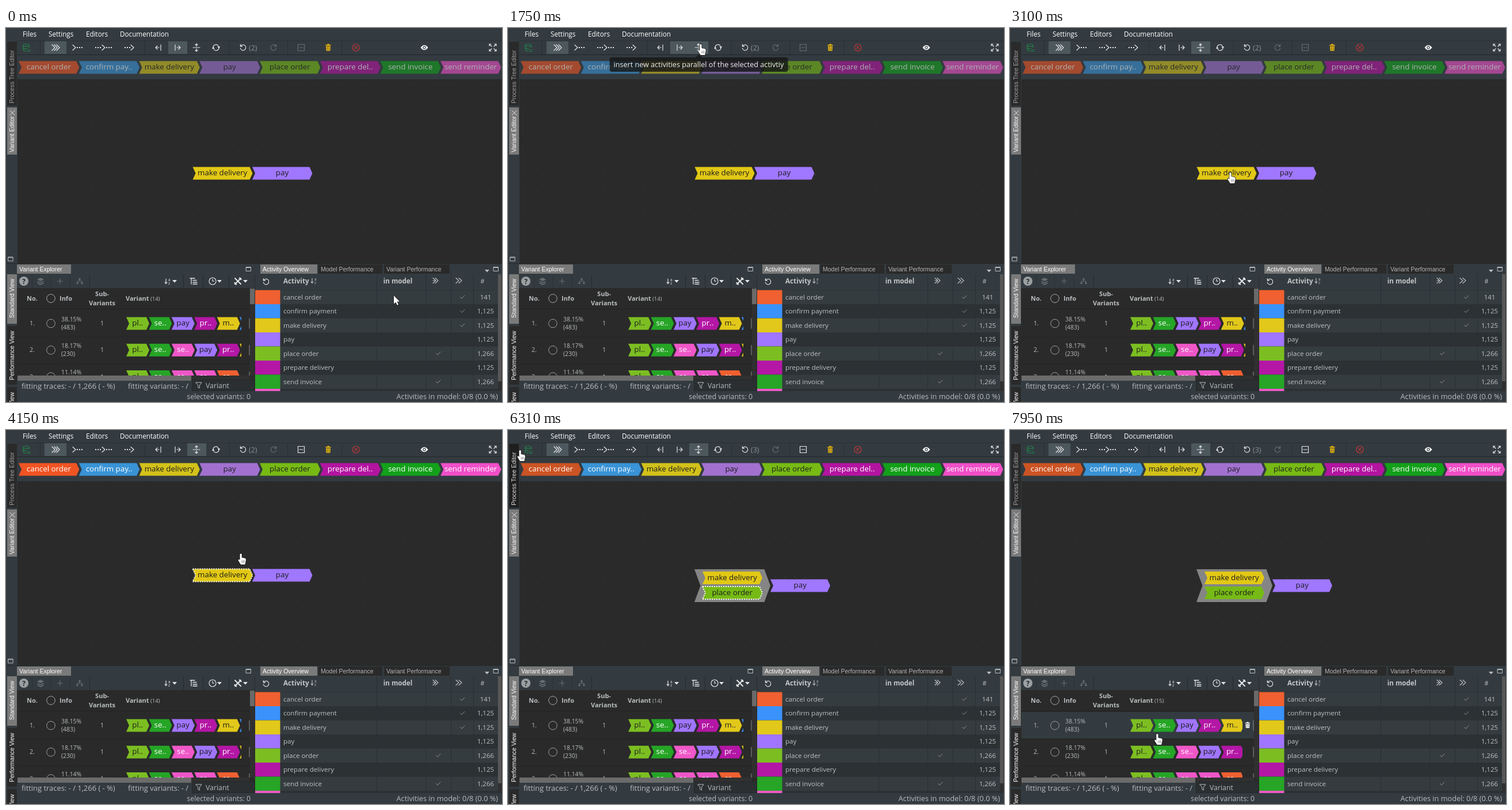
Write an HTML page with a canvas that moves like this. It is 862 px wide and 650 px high and loops after 8 s.

```html
<!DOCTYPE html>
<html lang="en">
<head>
<meta charset="utf-8">
<title>Variant editor</title>
<style>
  html, body { margin: 0; width: 100%; height: 100%; overflow: hidden; background: #2a2a2a; }
  canvas { display: block; }
</style>
</head>
<body>
<canvas id="stage" width="862" height="650"></canvas>
<script>
const ctx = document.getElementById('stage').getContext('2d');
const LOOP = 8000;
const UI = '"Open Sans", sans-serif';
const TAB_FONT = '10.5px "Liberation Sans", Arial, sans-serif';
const BAR = '#333b40', DARK = '#2a2a2a', GREY = '#7a7a7a', ACTIVE = '#4d575e';
const LIGHT = '#e4e6e7', MUTED = '#b9bdbf', DIM = '#8c9194', FAINT = '#666e72', INK = '#1c1c1c';

// name, short label, palette colour, strong colour, text colour, count, check column
const activities = [
  ['cancel order', 'cancel order', '#f05423', '#f06030', '#fff', '141', 793],
  ['confirm payment', 'confirm pay..', '#3993d6', '#3a92fc', '#fff', '1,125', 793],
  ['make delivery', 'make delivery', '#d2c11a', '#e2c81a', INK, '1,125', 793],
  ['pay', 'pay', '#a271d0', '#a075ff', INK, '1,125', 0],
  ['place order', 'place order', '#77ba14', '#7cbe22', INK, '1,266', 751],
  ['prepare delivery', 'prepare del..', '#b314a0', '#b417a5', '#fff', '1,125', 0],
  ['send invoice', 'send invoice', '#13a01a', '#26a526', '#fff', '1,266', 751],
  ['send reminder', 'send reminder', '#f04fc8', '#f057c8', '#fff', '', 0]
];

// time, x, y of the pointer tip
const route = [
  [0, 674, 465], [100, 674, 465], [330, 720, 505], [660, 720, 505], [800, 721, 505],
  [1100, 650, 380], [1400, 450, 120], [1610, 332, 32], [1750, 335, 28], [2200, 335, 28],
  [2650, 355, 130], [3030, 383, 251], [3880, 383, 252], [4150, 408, 215], [4400, 462, 125],
  [4610, 500, 68], [5700, 500, 68], [5950, 300, 74], [6200, 60, 52], [6310, 21, 35],
  [6500, 38, 36], [7080, 38, 36], [7180, 64, 84], [7500, 190, 380], [7730, 250, 518],
  [7800, 256, 527], [7950, 256, 528], [LOOP, 256, 528]
];

const clamp = v => Math.max(0, Math.min(1, v));
const during = (t, from, to) => t >= from && t < to;
const fade = (t, inStart, inEnd, outStart, outEnd) =>
  Math.min(clamp((t - inStart) / (inEnd - inStart)), clamp((outEnd - t) / (outEnd - outStart)));

function rect(x, y, w, h, color) {
  ctx.fillStyle = color;
  ctx.fillRect(x, y, w, h);
}
function text(str, x, y, size, color, align = 'left', weight = 400) {
  ctx.font = `${weight} ${size}px ${UI}`;
  ctx.fillStyle = color;
  ctx.textAlign = align;
  ctx.fillText(str, x, y);
}
function tabText(str, x, y, color, align = 'left', turned = false) {
  ctx.save();
  ctx.translate(x, y);
  if (turned) ctx.rotate(-Math.PI / 2);
  ctx.font = TAB_FONT;
  ctx.fillStyle = color;
  ctx.textAlign = align;
  ctx.fillText(str, 0, 0);
  ctx.restore();
}
function path(d, x, y, { fill, stroke, width = 1.2 }) {
  const shape = new Path2D(d);
  ctx.save();
  ctx.translate(x, y);
  ctx.lineJoin = ctx.lineCap = 'round';
  if (stroke) { ctx.strokeStyle = stroke; ctx.lineWidth = width; ctx.stroke(shape); }
  if (fill) { ctx.fillStyle = fill; ctx.fill(shape); }
  ctx.restore();
}
const line = (d, x, y, stroke = LIGHT, width = 1.2) => path(d, x, y, { stroke, width });
function circle(x, y, r, stroke, width = 1.2) {
  ctx.beginPath();
  ctx.arc(x, y, r, 0, 7);
  ctx.strokeStyle = stroke;
  ctx.lineWidth = width;
  ctx.stroke();
}
const outline = (w, h) => `M${-w / 2} ${-h / 2}h${w}v${h}h${-w}z`;

function chevron(x, y, w, h, notch, color, dotted) {
  const mid = y + h / 2;
  ctx.beginPath();
  [[x, y], [x + w - notch, y], [x + w, mid], [x + w - notch, y + h], [x, y + h], [x + notch, mid]]
    .forEach(([px, py]) => ctx.lineTo(px, py));
  ctx.closePath();
  ctx.fillStyle = color;
  ctx.fill();
  if (dotted) {
    ctx.setLineDash([2, 2]);
    ctx.strokeStyle = '#fff';
    ctx.lineWidth = 2;
    ctx.stroke();
    ctx.setLineDash([]);
  }
}
function step(label, x, y, w, color, ink, dotted) {
  chevron(x, y, w, 22, 5, color, dotted);
  text(label, x + w / 2 - 0.3, y + 14.5, 13.35, ink, 'center');
}

function trash(x, y, scale, color) {
  ctx.save();
  ctx.translate(x, y);
  ctx.scale(scale, scale);
  path('M-5 -5H5V-3.5H-5zM-2 -6.5H2V-5H-2zM-4.2 -2.5H4.2L3.6 6H-3.6z', 0, 0, { fill: color });
  line('M-1.6 -1V4.5M1.6 -1V4.5', 0, 0, BAR, 0.8);
  ctx.restore();
}
const caret = (x, y, color = LIGHT) => path('M-4 -2H4L0 2.5z', x, y, { fill: color });
const dots = (x, y) => { for (let i = 0; i < 3; i++) rect(x + i * 4, y, 2, 2, LIGHT); };
const maximize = (x, y) => line(outline(8, 7) + 'M-4 -2.5H4', x, y, MUTED, 1);
const UNDO = 'M-4.2 -2.4A4.8 4.8 0 1 1 -4.7 1.2M-4.6 -5.4V-2.2H-1.4';
const sortIcon = (x, y, color) => {
  line('M-3 -4V4M-5 2L-3 4.5L-1 2', x, y, color);
  text('a', x + 1, y, 6.5, color);
  text('z', x + 1, y + 6, 6.5, color);
};

function menuAndTools(t) {
  rect(0, 0, 862, 89, BAR);
  [['Files', 29], ['Settings', 74], ['Editors', 139], ['Documentation', 198]]
    .forEach(([s, x]) => text(s, x, 14.5, 11.7, '#fff'));
  rect(20, 22, 842, 1, '#2a3135');
  rect(20, 46, 842, 1, '#22282b');
  [59, 241, 388, 489, 584].forEach(x => rect(x, 23, 1, 23, '#293034'));

  rect(67, 23, 38, 22, ACTIVE);
  if (t < 1990) rect(282, 23, 33, 22, ACTIVE);
  if (t >= 1610) rect(315, 23, 33, 22, ACTIVE);

  const green = '#23834b';
  line('M-5 -4a5 2 0 0 1 10 0a5 2 0 0 1 -10 0V4a5 2 0 0 0 5 2M5 -4V0M-5 0a5 2 0 0 0 6 2', 35, 34, green);
  line('M2 4H7M2 6.5H7', 35, 34, green);

  line('M-6 -5L-1 0L-6 5M-2 -5L3 0L-2 5M2 -5L7 0L2 5', 86, 34, LIGHT, 1.3);
  const arrow = 'M-2 -4.5L3 0L-2 4.5';
  line(arrow, 118, 34); dots(123, 33);
  dots(155, 33); line(arrow, 169, 34); dots(174, 33);
  dots(206, 33); line(arrow, 219, 34);
  line('M4 -5V5M1 0H-5M-2 -3L-5 0L-2 3', 265, 34);
  line('M-4 -5V5M-1 0H5M2 -3L5 0L2 3', 298, 34);
  line('M-6 0H6M0 -2V-6M-2 -4.5L0 -6.5L2 -4.5M0 2V6M-2 4.5L0 6.5L2 4.5', 331, 34);
  line('M-5 -1A5 5 0 0 1 4 -3M5 1A5 5 0 0 1 -4 3', 365, 34);
  path('M2.5 -2H7L5 2zM-2.5 2H-7L-5 -2z', 365, 34, { fill: LIGHT });

  line(UNDO, 412, 34);
  text(t < 4930 ? '(2)' : '(3)', 422, 38.5, 12.3, DIM);
  ctx.save();
  ctx.translate(465, 34);
  ctx.scale(-1, 1);
  line(UNDO, 0, 0, FAINT);
  ctx.restore();

  line(outline(11, 11) + 'M-3 0H3', 513, 34, t < 3510 ? FAINT : LIGHT);
  trash(560, 34, 0.95, '#e9b60c');
  circle(608, 34, 6, '#c2353a');
  line('M-2.3 -2.3L2.3 2.3M2.3 -2.3L-2.3 2.3', 608, 34, '#c2353a');
  path('M-6.5 0Q0 -8.5 6.5 0Q0 8.5 -6.5 0', 727, 34, { fill: '#fff' });
  circle(727, 34, 2.1, BAR);
  line('M-2 -2L-6 -6M-6 -3V-6H-3M2 -2L6 -6M3 -6H6V-3M-2 2L-6 6M-6 3V6H-3M2 2L6 6M3 6H6V3', 846, 34);
}

function palette(t) {
  activities.forEach(([, label, base, , ink], i) => {
    let color = base;
    if (i === 0 && t >= 6200) color = during(t, 7110, 7280) ? '#ff8552' : '#cc5424';
    if (i === 4 && during(t, 4560, 5760)) color = '#8ccb35';
    step(label, 22 + 104.75 * i, 57.5, 105.3, color, ink);
  });
  if (t < 3510) {
    ctx.globalAlpha = 0.4;
    rect(20, 56, 842, 26, BAR);
    ctx.globalAlpha = 1;
  }
}

function editor(t) {
  rect(20, 89, 842, 321, DARK);
  for (let y = 97; y < 408; y += 17.5)
    for (let x = 26; x < 860; x += 17.5) rect(Math.round(x), Math.round(y), 1, 1, '#464646');
  const yellow = '#e2c815', violet = '#a077ff';
  if (t < 4930) {
    step('pay', 428, 241.5, 104.5, violet, INK);
    step('make delivery', 324.5, 241.5, 104, yellow, INK, t >= 3510);
  } else {
    chevron(324, 242, 132, 57, 10.5, '#858585');
    step('make delivery', 338, 246, 104, yellow, INK);
    step('place order', 338, 272, 104, '#76ba16', INK, t < 6870);
    step('pay', 456, 259.5, 104, violet, INK);
  }
}

function sideTabs(t) {
  rect(0, 22, 20, 628, BAR);
  const tabHovered = during(t, 6180, 6430);
  rect(2, 24, 17, 111, tabHovered ? '#1f1f1f' : DARK);
  tabText('Process Tree Editor', 14, 131, tabHovered ? '#e0e0e0' : '#a0a0a0', 'left', true);
  rect(2, 138, 17, 82, GREY);
  tabText('Variant Editor', 14, 216, '#fff', 'left', true);
  line('M-4 -4L4 4M4 -4L-4 4', 11, 147.5, '#e8e8e8', 1);
  maximize(8, 401.5);
  rect(2, 428, 17, 86, GREY);
  tabText('Standard View', 14, 504, '#fff', 'left', true);
  rect(2, 518, 17, 102, DARK);
  tabText('Performance View', 14, 612, '#fff', 'left', true);
  rect(2, 624, 17, 26, DARK);
  tabText('Tree View', 14, 633, '#fff', 'right', true);
}

function panelTabs() {
  rect(19, 410, 843, 18, BAR);
  rect(0, 409, 862, 1, '#24292c');
  [['Variant Explorer', 19, 94, 1], ['Activity Overview', 442, 99, 1],
   ['Model Performance', 543, 111, 0], ['Variant Performance', 657, 114, 0]]
    .forEach(([s, x, w, on]) => {
      rect(x, 411, w, 16, on ? GREY : DARK);
      tabText(s, x + 4, 422.5, on ? '#fff' : '#b5b5b5');
    });
  maximize(421.5, 419);
  maximize(851.5, 419);
  caret(836, 422, MUTED);
}

function explorer(t) {
  rect(19, 428, 413, 24, BAR);
  [145, 308, 342, 387].forEach(x => rect(x, 429, 1, 23, '#262c2f'));
  [45, 77, 111].forEach(x => rect(x, 429, 1, 23, '#2b3236'));
  ctx.beginPath();
  ctx.arc(31, 440, 8, 0, 7);
  ctx.fillStyle = '#9a9fa1';
  ctx.fill();
  text('?', 31, 444.5, 12, '#22282b', 'center', 700);
  path('M0 -6L6 -3L0 0L-6 -3z', 60, 440, { fill: FAINT });
  line('M-5 0.5L0 3L5 0.5M-5 3.5L0 6L5 3.5', 60, 440, FAINT, 1.4);
  line('M-4.5 0H4.5M0 -4.5V4.5', 94, 440, FAINT);
  line('M0 -3V0M-4 2V0H4V2', 128, 440, FAINT, 1);
  [[126.5, 435], [122.5, 442], [130.5, 442]].forEach(([x, y]) => rect(x, y, 3, 3, FAINT));
  sortIcon(281, 440, LIGHT);
  line('M-6 -5H2M-4 -5V5M-1 -1.5H5M-1 2H6M-1 5H6', 326, 440, LIGHT, 1.3);
  circle(359, 440, 6, LIGHT);
  line('M0 -3.5V0H2.5', 359, 440);
  line('M-5 -5L5 5M5 -5L-5 5', 403, 440, LIGHT, 2);
  line('M3 -5.5L5.5 -3M-5.5 3L-3 5.5', 403, 440, LIGHT, 2.4);
  [293, 371, 416].forEach(x => caret(x, 440));

  rect(19, 452, 413, 162, DARK);
  rect(19, 488, 405, 1, '#222');
  const head = (s, x, y, align = 'left') => text(s, x, y, 11, MUTED, align, 700);
  head('No.', 36, 474);
  circle(78, 470, 7.3, '#a8a8a8', 1);
  head('Info', 93, 474);
  head('Sub-', 167, 466, 'center');
  head('Variants', 167, 482, 'center');
  head('Variant', 208, 474);
  text(t < 6870 ? '(14)' : '(15)', 251, 474, 9.6, MUTED);

  const hovered = t >= 7740;
  ctx.save();
  ctx.beginPath();
  ctx.rect(19, 489, 405, 115);
  ctx.clip();
  if (hovered) rect(20, 490, 404, 46, BAR);
  rect(19, 536.5, 405, 1, '#242424');
  rect(19, 583, 405, 1, '#242424');
  const labels = ['ca..', 'co..', 'm..', 'pay', 'pl..', 'pr..', 'se..', 'se..'];
  [['38.15%', '(483)', [4, 6, 3, 5, 2, 1]],
   ['18.17%', '(230)', [4, 6, 7, 3, 5, 2]],
   ['11.14%', '(141)', [4, 6, 7, 7, 0]]].forEach(([share, count, steps], row) => {
    const y = 513.5 + 46.3 * row;
    text(`${row + 1}.`, 41, y + 3.5, 10.6, MUTED);
    circle(78, y, 7.3, '#a0a0a0', 1);
    text(share, 96, y - 4, 10.4, MUTED);
    text(count, 96, y + 10.5, 10.4, MUTED);
    text('1', 167, y + 3.5, 10.6, MUTED, 'center');
    ctx.save();
    ctx.beginPath();
    ctx.rect(205, y - 14, hovered ? 199 : 204, 28);
    ctx.clip();
    steps.forEach((id, i) => step(labels[id], 209 + 39.4 * i, y - 11, 40, activities[id][3], activities[id][4]));
    ctx.restore();
    rect(422.5, y - 9, 1, 18, '#8d8d8d');
  });
  if (hovered) trash(413, 513, 0.85, '#fff');
  ctx.restore();

  rect(424, 452, 8, 152, '#303030');
  rect(424, 453, 8, 27, '#696969');
  rect(20, 604, 404, 9, '#303030');
  rect(20, 604, 302, 9, '#6b6b6b');
}

function overview() {
  rect(432, 428, 430, 203, DARK);
  rect(433, 428, 422, 27, BAR);
  line(UNDO, 452, 441);
  text('Activity', 482, 443.5, 11.7, '#c4c7c9', 'left', 700);
  sortIcon(535, 439, MUTED);
  text('in model', 681, 443.5, 11.6, '#c4c7c9', 'center', 700);
  line('M-5 -4.5L0 0L-5 4.5M-1 -4.5L4 0L-1 4.5M-5 0H0', 747, 439, MUTED);
  line('M-5 -4.5L0 0L-5 4.5M0 -4.5L5 0L0 4.5', 787, 439, MUTED);
  text('#', 828, 443.5, 11, MUTED, 'center');

  ctx.save();
  ctx.beginPath();
  ctx.rect(433, 455, 422, 176);
  ctx.clip();
  activities.forEach(([name, , , color, , count, checkX], i) => {
    const y = 455.5 + 24.5 * i;
    rect(433, y, 422, 24.5, i % 2 ? '#2c3134' : '#353c40');
    rect(433, y, 43.5, 24.5, color);
    if (i === 7) return;
    text(name, 482, y + 16, 11.6, '#bdc1c3');
    text(count, 833.5, y + 16, 11.5, '#bdc1c3', 'center');
    if (checkX) line('M-3.5 0L-1 2.5L4 -2.5', checkX, y + 12, DIM, 1);
  });
  ctx.restore();
  [644, 729, 773, 812].forEach(x => rect(x, 428, 1, 203, '#293034'));
  rect(855, 428, 7, 203, '#303030');
  rect(855, 428, 6, 186, '#575757');
}

function statusBar() {
  rect(20, 613, 412, 18, BAR);
  rect(20, 631, 842, 19, BAR);
  text('fitting traces: - / 1,266 ( - %)', 27, 627, 12.95, MUTED);
  text('fitting variants: - /', 212, 627, 12.85, MUTED);
  rect(323, 611, 109, 20, '#23282b');
  rect(324, 612, 107, 18, '#2b2f31');
  line('M-5 -5H5L1.3 0V5L-1.3 3.5V0z', 335, 621, MUTED, 1);
  text('Variant', 347, 625.5, 12.3, MUTED);
  text('selected variants: 0', 425, 644.5, 12.4, MUTED, 'right');
  text('Activities in model: 0/8 (0.0 %)', 855, 644.5, 12.75, MUTED, 'right');
}

function tooltip(label, x, y, w, h, opacity, size, tail) {
  if (opacity <= 0) return;
  ctx.globalAlpha = opacity * 0.9;
  ctx.beginPath();
  ctx.roundRect(x, y, w, h, 4);
  ctx.fillStyle = '#161718';
  ctx.fill();
  path(tail, 0, 0, { fill: '#161718' });
  ctx.globalAlpha = opacity;
  text(label, x + 7, y + h / 2 + 4, size, '#fff');
  ctx.globalAlpha = 1;
}

function pointer(t) {
  const next = Math.max(1, route.findIndex(([time]) => time > t));
  const [t0, x0, y0] = route[next - 1], [t1, x1, y1] = route[next];
  const u = (t - t0) / (t1 - t0);
  const x = x0 + (x1 - x0) * u, y = y0 + (y1 - y0) * u;
  const isHand = during(t, 1520, 7110) || t >= 7740;
  const shape = isHand
    ? 'M-1.7 1.6a1.6 1.6 0 0 1 3.2 0V7l5.5 1.1q2 .5 1.8 2.8L8 15.5L7.2 19H-.3L-4.4 12.4q-.8-1.6.5-2.1t2.2 1.4z'
    : 'M0 0V14.5L3.4 11.5L5.8 16.8L8 15.8L5.7 10.6H10.2z';
  path(shape, x, y, { fill: '#fff', stroke: '#111', width: 1.4 });
  if (isHand) line('M1.8 12V16M4 12V16M6 12V16', x, y, '#444', 0.6);
}

function draw(now) {
  const t = now % LOOP;
  menuAndTools(t);
  palette(t);
  editor(t);
  sideTabs(t);
  panelTabs();
  explorer(t);
  overview();
  statusBar();
  tooltip('insert new activities parallel of the selected activtiy', 176.5, 51, 310, 25,
    fade(t, 1640, 1760, 2240, 2420), 12.62, 'M326 51L331.5 46L337 51z');
  tooltip('Add variant to Log', 57, 22, 124, 24.5,
    fade(t, 6450, 6560, 7150, 7330), 12.8, 'M57 29L52 34.5L57 40z');
  pointer(t);
  requestAnimationFrame(draw);
}
requestAnimationFrame(draw);
</script>
</body>
</html>
```
